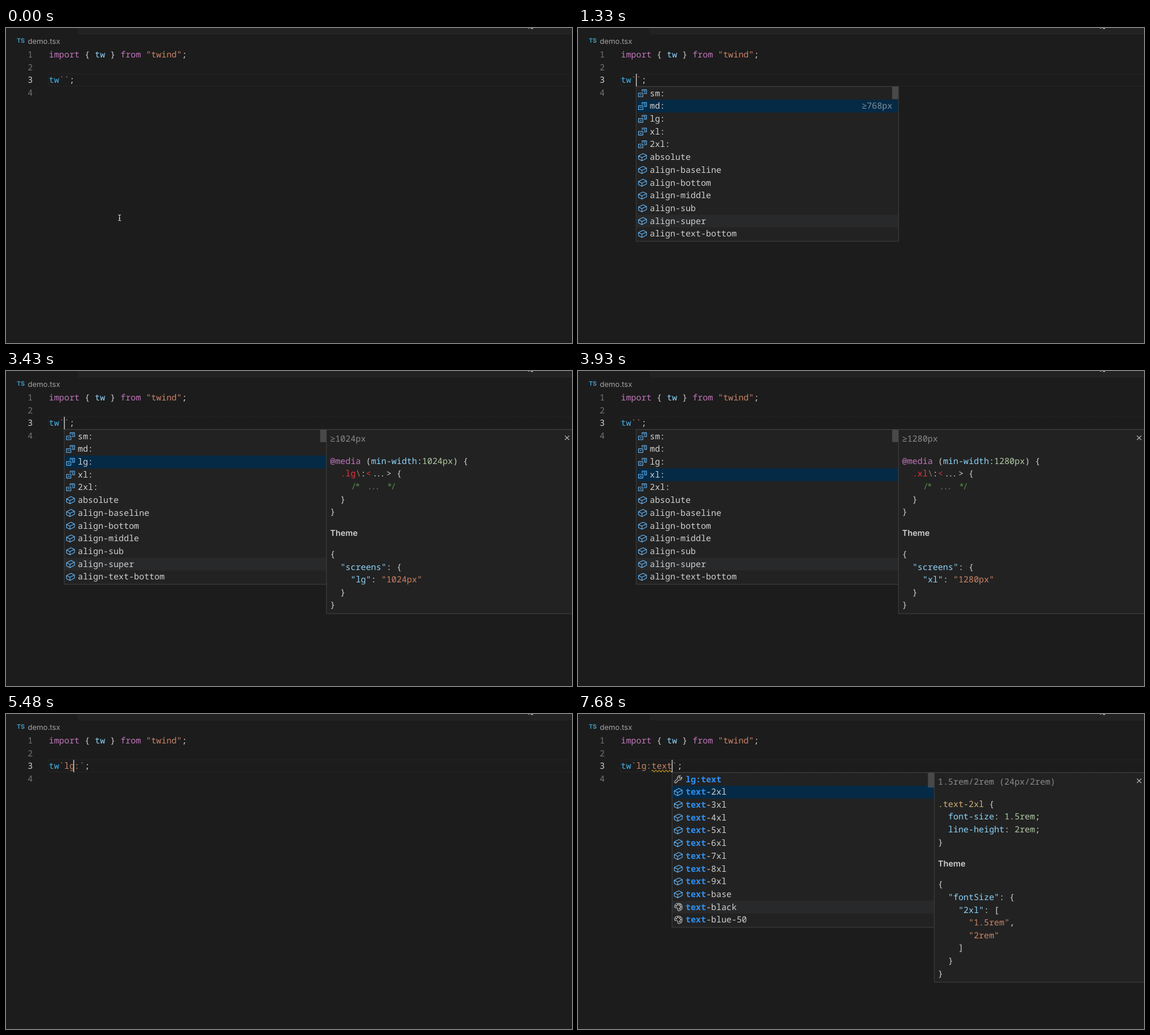
Recreate the animation shown at these times as an HTML page. Size 960x535 px, loop 8000 ms.

```html
<!DOCTYPE html>
<html lang="en">
<head>
<meta charset="utf-8">
<title>Editor completion demo</title>
<style>
  html, body { margin: 0; width: 100%; height: 100%; overflow: hidden; background: #1c1c1c; }
  svg { display: block; width: 960px; height: 535px; }
  text { white-space: pre; font: 14.45px "Noto Sans Mono", "DejaVu Sans Mono", monospace; fill: #d0d0d0;
         font-variant-ligatures: none; text-rendering: geometricPrecision; }
  .ui { font-family: Inter, Roboto, sans-serif; }
  .kw { fill: #c176bb; }
  .var { fill: #8cd4fa; }
  .fn { fill: #45b0ea; }
  .str { fill: #cb8466; }
  .tick { fill: #a3755f; }
  .num { fill: #b2caa5; }
  .sel { fill: #d0b177; }
  .bad { fill: #e5343b; }
  .esc { fill: #92805f; }
  .rem { fill: #578f45; }
  .dim { fill: #8b8b8b; }
  .gutter { fill: #747474; }
  .hit { fill: #2f90f2; font-weight: 700; }
  .tight { letter-spacing: -2.3px; }
  .icon { fill: none; stroke: #62b4f5; stroke-width: 1.1; stroke-linejoin: round; }
  .light { stroke: #c4c4c4; }
</style>
</head>
<body>
<svg id="stage" viewBox="0 0 960 535"></svg>
<script>
const LOOP = 8000;
const CW = 8.67, LH = 21.7, LEFT = 72.8;
const stage = document.getElementById("stage");

const esc = s => s.replace(/&/g, "&amp;").replace(/</g, "&lt;").replace(/>/g, "&gt;");
const text = (x, y, s, cls = "", attrs = "") =>
  `<text x="${x.toFixed(2)}" y="${y.toFixed(2)}" class="${cls}" ${attrs}>${esc(s)}</text>`;
const rect = (x, y, w, h, fill, attrs = "") =>
  `<rect x="${x}" y="${y}" width="${w}" height="${h}" fill="${fill}" ${attrs}/>`;
const path = (d, attrs = "") => `<path d="${d}" ${attrs}/>`;

// Places [string, class] runs one after another on the character grid.
function runs(x, y, list) {
  let col = 0;
  return list.map(([s, cls]) => {
    const tight = (cls || "").includes("tight");
    const shift = tight ? (s.length === 3 ? 2.3 : 1.1) : 0;
    const out = text(x + col * CW + shift, y, s, cls);
    col += s.length;
    return out;
  }).join("");
}

const breakpoints = { sm: 640, md: 768, lg: 1024, xl: 1280 };
const variants = ["sm:", "md:", "lg:", "xl:", "2xl:"];
const utilities = ["absolute", "align-baseline", "align-bottom", "align-middle",
  "align-sub", "align-super", "align-text-bottom"];
const sizes = ["2xl", "3xl", "4xl", "5xl", "6xl", "7xl", "8xl", "9xl", "base", "black", "blue-50"];

const screenList = {
  thumb: 20.8,
  items: [
    ...variants.map(label => ({ label, icon: "variant" })),
    ...utilities.map(label => ({ label, icon: "cube" })),
  ],
};
const textList = word => ({
  thumb: 24.8,
  items: [
    { label: "lg:" + word, icon: "wrench", hit: 3 + word.length },
    ...sizes.map((s, i) => ({ label: "text-" + s, icon: i < 9 ? "cube" : "palette", hit: word.length })),
  ],
});

const dot = (x, y) => `<circle cx="${x}" cy="${y}" r=".75"/>`;
const icons = {
  variant: path("M-.6 -2.4V-6H6.8V.6H2.6M1.4 -3.9H5M2.6 -1.6H5M-6.8 -.4H.6V5.9H-6.8ZM-4.8 2.7H-1.4", 'class="icon"'),
  cube: path("M-6.8 -2.1L1 -6L6.8 -3.1V2.2L-1 6.1L-6.8 3.2ZM-6.8 -2.1L-1 .7L6.8 -3.1M-1 .7V6.1", 'class="icon"'),
  wrench: path("M5.9 -3.6L3.2 -1.2L1.2 -3.2L3.7 -5.9C.6 -6.9 -2.2 -4.2 -1.2 -1.2L-6 3.6C-7.2 5.1 -5.2 7 -3.7 5.9L1.1 1.1C4.2 2.1 6.9 -.6 5.9 -3.6Z", 'class="icon light"'),
  palette: `<g class="icon light">${path("M-6.3 -1.5C-5.4 -8.2 6.4 -8 6.5 0C6.6 4.6 3 6.7 .2 6.2C-2.4 5.6 .4 2.7 -1.6 1.6C-3.6 .4 -6.6 3 -6.3 -1.5Z")}${
    dot(-3.4, -2)}${dot(-.7, -4)}${dot(2.6, -3.2)}${dot(4, -.2)}${dot(2.6, 2.8)}</g>`,
};

function screenDetail(name) {
  const px = breakpoints[name] + "px";
  return {
    head: "≥" + px, bottom: 412.2,
    css: [
      [["@media", "kw"], [" ("], ["min-width", "var"], [":"], [px, "num"], [") {"]],
      [["  "], ["." + name, "bad"], ["\\", "esc"], [":"], ["<", "bad"], ["...", "tight"], ["> {"]],
      [["    "], ["/*", "rem tight"], [" "], ["...", "rem tight"], [" "], ["*/", "rem tight"]],
      [["  }"]],
      [["}"]],
    ],
    theme: [
      [["{"]],
      [["  "], ['"screens"', "var"], [": {"]],
      [["    "], [`"${name}"`, "var"], [": "], [`"${px}"`, "str"]],
      [["  }"]],
      [["}"]],
    ],
  };
}

const sizeDetail = {
  head: "1.5rem/2rem (24px/2rem)", bottom: 455.6,
  css: [
    [[".text-2xl", "sel"], [" {"]],
    [["  "], ["font-size", "var"], [": "], ["1.5rem", "num"], [";"]],
    [["  "], ["line-height", "var"], [": "], ["2rem", "num"], [";"]],
    [["}"]],
  ],
  theme: [
    [["{"]],
    [["  "], ['"fontSize"', "var"], [": {"]],
    [["    "], ['"2xl"', "var"], [": ["]],
    [["      "], ['"1.5rem"', "str"], [","]],
    [["      "], ['"2rem"', "str"]],
    [["    ]"]],
    [["  }"]],
    [["}"]],
  ],
};

const emmetDetail = word => ({
  head: "Emmet Abbreviation", bottom: 168.6, plain: `<lg:${word}>|</lg:${word}>`,
});

function drawList(x, list, picked, note) {
  let out = rect(x, 99.5, 445, 262.7, "#222222");
  list.items.forEach((item, i) => {
    const top = 100 + i * LH, mid = top + LH / 2;
    const fill = i === picked ? "#052a46" : i === 10 ? "#28292b" : "";
    if (fill) out += rect(x + .5, top + .2, 444, LH, fill);
    out += `<g transform="translate(${x + 10.6} ${mid})">${icons[item.icon]}</g>`;
    const hit = item.hit || 0;
    out += runs(x + 23, mid + 4.8, [[item.label.slice(0, hit), "hit"], [item.label.slice(hit)]]);
    if (note && i === picked)
      out += text(x + 434.4 - note.length * CW, mid + 4.8, note, "", 'fill-opacity=".6"');
  });
  out += rect(x + 434, 100, 10.5, list.thumb, "#797979", 'fill-opacity=".45"');
  return out + rect(x, 99.5, 445, 262.7, "none", 'stroke="#404040"');
}

function drawDetail(x, d) {
  const step = 21.6, tx = x + 6.2;
  let out = rect(x, 99.5, 970 - x, d.bottom - 99.5, "#222222", 'stroke="#404040"');
  out += text(tx, 119.8, d.head, "dim");
  out += path("M948 109.8L955.4 117.2M955.4 109.8L948 117.2", 'stroke="#c8c8c8" stroke-width="1.1"');
  if (d.plain) return out + text(tx, 157.8, d.plain, "ui", 'style="font-size:13.1px"');
  let y = 157.8;
  for (const line of d.css) { out += runs(tx, y, line); y += step; }
  y += 14.3;
  out += text(tx, y, "Theme", "ui", 'style="font-size:13.9px;font-weight:600"');
  y += 35.8;
  for (const line of d.theme) { out += runs(tx, y, line); y += step; }
  return out;
}

function drawEditor(s) {
  const base = n => 49.9 + (n - 1) * LH;
  let out = rect(0, 0, 960, 535, "#1c1c1c") + rect(122, 0, 838, 11, "#222222");
  out += path("M884.5 0H888L887 1.3ZM889.5 0H894V1.6H891Z", 'fill="#b5b5b5"');
  out += text(18.2, 25.4, "TS", "ui", 'style="font-size:10.3px;font-weight:700;fill:#3f97c2"');
  out += text(37, 26.5, "demo.tsx", "ui", 'style="font-size:12.6px;fill:#a2a2a2"');
  out += rect(72.5, 78, 900, 20.6, "none", 'stroke="#292929" stroke-dasharray="1.5 .7"');
  for (let n = 1; n <= 4; n++)
    out += text(36.7, base(n), String(n), n === 3 ? "" : "gutter");
  out += runs(LEFT, base(1), [["import", "kw"], [" { "], ["tw", "var"], [" } "], ["from", "kw"],
    [" "], ['"twind"', "str"], [";"]]);
  out += runs(LEFT, base(3), [["tw", "fn"], ["`", "tick"], [s.typed, "str"], ["`", "tick"], [";"]]);
  if (s.squiggle) {
    let d = "M124.8 96.8";
    for (let i = 0; i < 6; i++) d += "q1.45 -3 2.9 0t2.9 0";
    out += path(d, 'fill="none" stroke="#b78f25" stroke-width="1.2"');
  }
  if (s.mouse) {
    const beam = "M190.2 317.3Q192.6 317.3 192.6 319V325.6Q192.6 327.3 190.2 327.3M195 317.3Q192.6 317.3 192.6 319M192.6 325.6Q192.6 327.3 195 327.3M191.2 323H194";
    out += path(beam, 'fill="none" stroke="#0c0c0c" stroke-width="2.6"');
    out += path(beam, 'fill="none" stroke="#dcdcdc" stroke-width="1.1"');
  }
  return out;
}

function draw(s) {
  let out = drawEditor(s);
  if (s.list) {
    const x = +(LEFT + s.at * CW).toFixed(1);
    const note = s.list === screenList && !s.detail ? s.note : "";
    out += drawList(x, s.list, s.picked, note);
    if (s.detail) out += drawDetail(x + 444.8, s.detail);
  }
  if (s.caret) out += rect((LEFT + s.col * CW - .6).toFixed(2), 77.8, 1.5, 21.2, "#c4c4c4");
  stage.innerHTML = out;
}

const pick = name => ({ picked: variants.indexOf(name + ":"), detail: screenDetail(name) });

// Each step changes part of the state from its time (ms) on.
const steps = [
  [0, { typed: "", col: 3, at: 3, caret: false, mouse: true, list: null, detail: null, squiggle: false }],
  [430, { caret: true }],
  [580, { mouse: false, list: screenList, picked: 0, note: "≥640px" }],
  [880, { caret: false }],
  [1330, { caret: true, picked: 1, note: "≥768px" }],
  [1730, { caret: false }],
  [2080, pick("md")],
  [2330, { caret: true }],
  [2550, pick("lg")],
  [2830, { caret: false }],
  [3030, pick("md")],
  [3430, { caret: true, ...pick("lg") }],
  [3630, pick("xl")],
  [3930, { caret: false }],
  [4180, pick("lg")],
  [4430, { caret: true }],
  [4930, { caret: false }],
  [5080, { caret: true }],
  [5480, { typed: "lg:", col: 4.83, list: null, detail: null }],
  [5550, { col: 6 }],
  [5630, { caret: false }],
  [6330, { typed: "lg:t", col: 7, caret: true }],
  [6430, { typed: "lg:te", col: 8 }],
  [6530, { typed: "lg:tex", col: 9 }],
  [6580, { list: textList("tex"), picked: 0, at: 9 }],
  [6630, { detail: emmetDetail("tex") }],
  [6680, { typed: "lg:text", col: 10 }],
  [6730, { list: textList("text"), at: 10, detail: emmetDetail("text") }],
  [7080, { picked: 1, detail: sizeDetail, squiggle: true }],
  [7180, { caret: false }],
  [7680, { caret: true }],
];
let state = {};
const scenes = steps.map(([time, change]) => ({ time, state: state = { ...state, ...change } }));

const start = performance.now();
let shown = -1;
function tick() {
  const t = (performance.now() - start) % LOOP;
  let i = scenes.length - 1;
  while (scenes[i].time > t) i--;
  if (i !== shown) draw(scenes[shown = i].state);
  requestAnimationFrame(tick);
}
tick();
</script>
</body>
</html>
```
